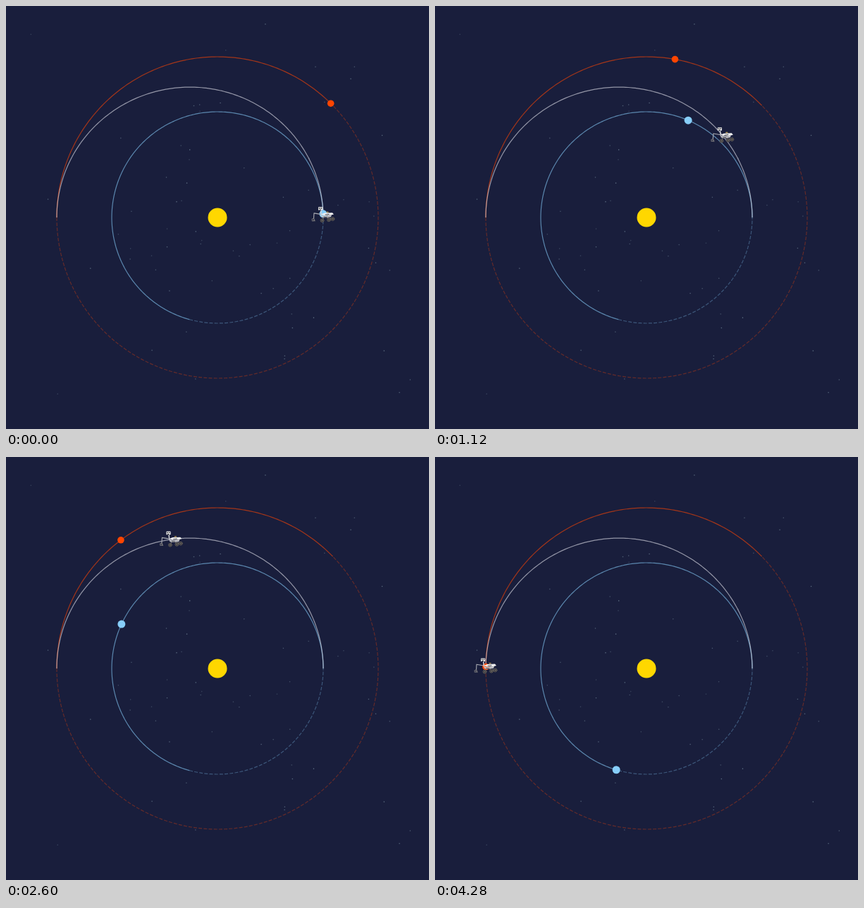
Recreate the animation shown at these times as an HTML page. Size 600 by 600 pixels, loop 4320 ms.

```html
<!DOCTYPE html>
<html lang="en">
<head>
<meta charset="utf-8">
<title>Transfer orbit</title>
<style>
  html, body { margin: 0; width: 100%; height: 100%; overflow: hidden; background: #191e3c; }
  svg { display: block; width: 100vw; height: 100vh; }
  .orbit { fill: none; stroke-width: 1.2; stroke-opacity: .6; }
  .dashed { stroke-dasharray: 5 2.2; stroke-opacity: .32; }
</style>
</head>
<body>
<svg viewBox="0 0 600 600" xmlns="http://www.w3.org/2000/svg">
  <defs>
    <g id="wheel">
      <circle r="2.4" fill="#37373d" stroke="#6e675f" stroke-width=".8"/>
      <circle r=".7" fill="#a09789"/>
    </g>
  </defs>
  <rect width="600" height="600" fill="#191e3c"/>
  <g id="stars" fill="#a9c8d2"></g>
  <g id="orbits"></g>
  <circle cx="300" cy="300" r="13.5" fill="#ffd700"/>
  <circle id="earth" r="5.5" fill="#87cefa"/>
  <circle id="mars" r="4.8" fill="#ff4500"/>
  <g id="rover" fill="none" stroke-linecap="round" stroke-linejoin="round">
    <!-- arm and tool -->
    <path d="M-4-1L-13-2.5L-13.5 5" stroke="#a9abb3" stroke-width="1.1"/>
    <path d="M-16 6.5L-13.5 5L-12 8.5M-15.8 8.2H-13" stroke="#7b7a7c" stroke-width="1.2"/>
    <!-- suspension -->
    <path d="M-1.5 7.5L1 2.5L7.5 4.5L13.5 5.5" stroke="#6f6e72" stroke-width="1.1"/>
    <!-- chassis -->
    <path d="M-3 .5L4 1.5L12 0L11 3L2 4L-2 3Z" fill="#c4c4c8"/>
    <path d="M-3-.8L2-2.8L13-3.2L15-.8L11 .2L3 1Z" fill="#f1f1f1"/>
    <path d="M3-.2L8-1M1 2.8L5 3.2" stroke="#45464e"/>
    <path d="M5-4H7" stroke="#c3a45c" stroke-width="1.3"/>
    <!-- mast and cameras -->
    <path d="M-3.3-6L-2.6 0" stroke="#d2d3d8" stroke-width="1.5"/>
    <rect x="-7" y="-11.3" width="6.2" height="4.6" rx=".8" fill="#eee"/>
    <path d="M-5.7-9.6H-4.8M-3-9.6H-2.2M-5-7.3H-3.6" stroke="#292a32" stroke-width="1.3"/>
    <use href="#wheel" x="-1.5" y="7.9"/>
    <use href="#wheel" x="8" y="7"/>
    <use href="#wheel" x="13.5" y="5.7"/>
  </g>
</svg>
<script>
const LOOP = 4320, HOLD = 40, SIM_STEP = 1000 / 30;
const CENTER = 300, EARTH_R = 150, MARS_R = 228;
const AXIS = (EARTH_R + MARS_R) / 2;
const ECC = (MARS_R - EARTH_R) / (MARS_R + EARTH_R);

// Kepler's third law gives how far each planet turns during the half-ellipse transfer.
const sweep = radius => 180 * (AXIS / radius) ** 1.5;
const EARTH_SWEEP = sweep(EARTH_R);
const MARS_START = 180 - sweep(MARS_R);

const rad = degrees => degrees * Math.PI / 180;
const earthRadius = () => EARTH_R;
const marsRadius = () => MARS_R;
const transferRadius = angle => AXIS * (1 - ECC * ECC) / (1 + ECC * Math.cos(rad(angle)));

function polar(radius, angle) {
  return [CENTER + radius * Math.cos(rad(angle)), CENTER - radius * Math.sin(rad(angle))]
    .map(v => v.toFixed(2));
}

function add(parent, tag, attrs) {
  const node = document.createElementNS('http://www.w3.org/2000/svg', tag);
  for (const key in attrs) node.setAttribute(key, attrs[key]);
  document.getElementById(parent).appendChild(node);
}

function orbit(radiusAt, from, to, color, kind = '') {
  const points = [];
  const count = Math.ceil(to - from);
  for (let i = 0; i <= count; i++) {
    const angle = from + (to - from) * i / count;
    points.push(polar(radiusAt(angle), angle));
  }
  add('orbits', 'path', { d: 'M' + points.join('L'), stroke: color, class: 'orbit ' + kind });
}

let seed = 7;
const random = () => (seed = seed * 16807 % 2147483647) / 2147483647;
const scatter = () => CENTER + 320 * (random() + random() - 1);

for (let i = 0; i < 68; i++)
  add('stars', 'circle', { cx: scatter(), cy: scatter(), r: 0.8, opacity: 0.2 + 0.25 * random() });

orbit(earthRadius, EARTH_SWEEP, 360, '#87cefa', 'dashed');
orbit(marsRadius, 180, 360 + MARS_START, '#ff4500', 'dashed');
orbit(earthRadius, 0, EARTH_SWEEP, '#87cefa');
orbit(marsRadius, MARS_START, 180, '#ff4500');
orbit(transferRadius, 0, 180, '#e6e6ee');

function place(id, radius, angle) {
  document.getElementById(id).setAttribute('transform', `translate(${polar(radius, angle)})`);
}

// The flight advances in 30 Hz steps, shown at 25 pictures a second.
function draw(ms) {
  const shown = Math.floor(ms % LOOP / HOLD) * HOLD;
  const step = Math.floor(shown * 30 / 1000) + 1;
  const u = step * SIM_STEP / LOOP;
  const angle = 180 * u;
  place('earth', EARTH_R, EARTH_SWEEP * u);
  place('mars', MARS_R, MARS_START + (180 - MARS_START) * u);
  place('rover', transferRadius(angle), angle);
}

const start = performance.now();
function tick() {
  draw(performance.now() - start);
  requestAnimationFrame(tick);
}
tick();
</script>
</body>
</html>
```
